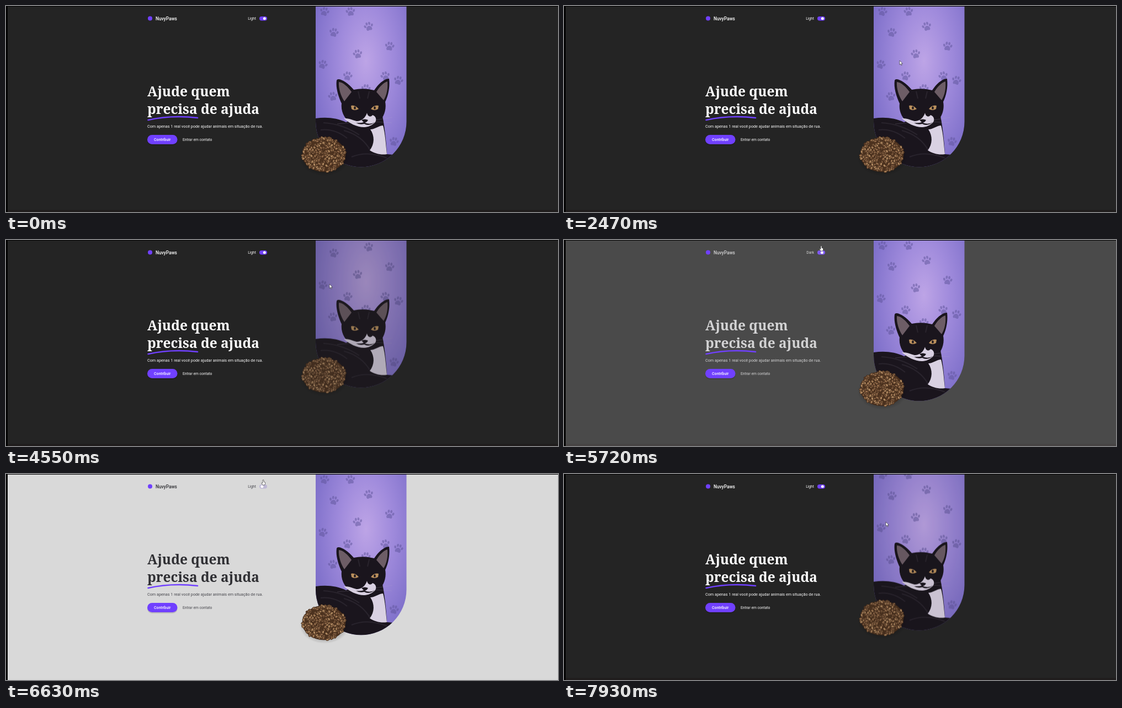
These frames come from a looping animation (1000x374 px, 8000 ms). An HTML page:

```html
<!DOCTYPE html>
<html lang="pt-BR">
<head>
<meta charset="utf-8">
<title>NuvyPaws</title>
<style>
  html, body { margin: 0; width: 100%; height: 100%; overflow: hidden; background: #000; }
  svg { display: block; width: 1000px; height: 374px; font-family: Roboto, sans-serif; }
  #page { fill: var(--bg); }
  #floor { fill: var(--floor); }
  .title { font: 700 24.45px "Noto Serif", serif; fill: var(--title); }
  .brand { font-size: 8.3px; font-weight: 500; fill: var(--title); }
  .lead { font-size: 7.24px; fill: var(--text); }
  .small { font-size: 6.7px; fill: var(--text); }
  .button { font-size: 6.8px; font-weight: 500; fill: #fff; }
  .accent { fill: #7040ff; }
  #track { fill: var(--track); }
  .fur { fill: #1a151d; }
  .sheen { fill: none; stroke: #3d3542; stroke-width: 2; opacity: .45; }
  .white { fill: #d9d1e2; }
  .ear { fill: #6d5d66; }
  .eye { fill: #b98f5c; }
  .whisker { fill: none; stroke: #b9b0c4; stroke-width: .4; opacity: .5; }
  #paws { fill: #5d5298; opacity: .5; }
  #food ellipse { stroke: #3d2718; stroke-width: .8; }
</style>
</head>
<body>
<svg viewBox="0 0 1000 374">
  <defs>
    <radialGradient id="wall" gradientUnits="userSpaceOnUse" cx="0" cy="0" r="1"
      gradientTransform="translate(652 100) scale(105 220)">
      <stop offset="0" stop-color="#bda4e6"/>
      <stop offset=".45" stop-color="#a08bdc"/>
      <stop offset="1" stop-color="#7b6dc8"/>
    </radialGradient>
    <radialGradient id="shade">
      <stop offset=".6" stop-color="#000" stop-opacity=".3"/>
      <stop offset="1" stop-color="#000" stop-opacity="0"/>
    </radialGradient>
    <clipPath id="frame">
      <path d="M561-20H725.5V210A82.2 82.2 0 0 1 561 210Z"/>
    </clipPath>
    <g id="paw">
      <path d="M0-1C3-1 6 3 5 6C4 8.500 2 7 0 7S-4 8.500-5 6C-6 3-3-1 0-1Z"/>
      <ellipse cx="-6.300" cy="-1" rx="1.900" ry="2.700" transform="rotate(-25 -6.300 -1)"/>
      <ellipse cx="-2.400" cy="-5" rx="1.900" ry="2.900"/>
      <ellipse cx="2.400" cy="-5" rx="1.900" ry="2.900"/>
      <ellipse cx="6.300" cy="-1" rx="1.900" ry="2.700" transform="rotate(25 6.300 -1)"/>
    </g>
  </defs>

  <rect id="page" x="3" y="1" width="997" height="373"/>
  <rect id="floor" x="3" y="370" width="997" height="4"/>

  <circle class="accent" cx="261" cy="22.500" r="4"/>
  <text class="brand" x="271" y="25.600">NuvyPaws</text>
  <text class="small" id="mode" x="453" y="25" text-anchor="end">Light</text>
  <rect id="track" x="459" y="19" width="14" height="7.400" rx="3.700"/>
  <circle id="knob" cy="22.700" r="2.500" fill="#fff"/>

  <text class="title" x="256" y="164">Ajude quem</text>
  <text class="title" x="256" y="195.500">precisa de ajuda</text>
  <path d="M257.500 207Q300 197.500 347 203" fill="none" stroke="#7040ff" stroke-width="2.600" stroke-linecap="round"/>
  <text class="lead" x="256" y="220.500">Com apenas 1 real você pode ajudar animais em situação de rua.</text>
  <rect x="256" y="236" width="54.500" height="17" rx="8.500" fill="#000" opacity=".14"/>
  <rect class="accent" x="256" y="234" width="54.500" height="17" rx="8.500"/>
  <text class="button" x="283.200" y="245" text-anchor="middle">Contribuir</text>
  <text class="small" x="320" y="245">Entrar em contato</text>

  <g id="hero">
    <g clip-path="url(#frame)">
      <rect x="561" y="-20" width="165" height="313" fill="url(#wall)"/>
      <g id="paws"></g>
      <path class="fur" d="M561 204C580 201 600 203 616 211L640 200H682C687 225 689 250 690 269L726 272V295H561Z"/>
      <path class="sheen" d="M575 212Q610 214 640 234M612 226Q645 235 660 262M626 274Q655 262 690 276M570 225Q595 222 618 240"/>
      <path class="white" d="M660 224C668 224 676 217 683 217C687 232 688 250 690 269C680 271 668 268 659 262C668 250 668 236 660 224Z"/>
      <path class="fur" d="M599 135C602 129 618 138 630 152Q648 148 667 153C674 142 686 131 694 132C696 148 692 164 687 174C690 190 683 205 672 213C662 222 640 224 628 214C614 208 606 192 608 177C602 164 597 148 599 135Z"/>
      <path class="ear" d="M603 138C610 138 620 147 626 156L613 173C607 164 602 150 603 138ZM691 137C684 139 676 147 671 156L684 171C690 162 692 149 691 137Z"/>
      <path class="sheen" d="M638 155L641 168M658 155L655 168"/>
      <path class="eye" d="M625 181Q632 179 639 187Q631 191 626 187ZM675 181Q667 179 661 187Q668 191 674 187Z"/>
      <ellipse cx="632" cy="185" rx="1.800" ry="2.800" fill="#1a151d"/>
      <ellipse cx="668" cy="185" rx="1.800" ry="2.800" fill="#1a151d"/>
      <path class="white" d="M654 194C655 200 660 203 664 198C671 200 672 208 668 212C660 219 653 220 648 220C636 220 622 213 612 204C622 203 631 209 637 209C645 208 651 203 654 194Z"/>
      <path class="fur" d="M644 207Q650 204 656 207Q654 211 650 212Q660 216 668 211Q658 219 649 214Q640 216 634 212Q643 213 648 211Z"/>
      <path class="whisker" d="M664 208L700 202M664 210L699 212M634 211L600 214"/>
    </g>
    <ellipse cx="577" cy="275" rx="45" ry="33" fill="url(#shade)"/>
    <g id="food"><ellipse cx="576" cy="270" rx="39" ry="31" fill="#4e331f"/></g>
  </g>
  <rect width="1000" height="1"/>

  <g id="cursor" stroke="#222" stroke-width=".6" stroke-linejoin="round" fill="#fff">
    <path id="arrow" d="M0 0V7.600L1.800 6L3 8.800L4.300 8.200L3.100 5.600H5.400Z"/>
    <path id="hand" d="M-1 0Q0-1 1 0V3.300L3.600 4.200Q4 7 2.600 9H-1.200L-3.300 5.400Q-2.500 4.200-1 5.600Z"/>
  </g>
</svg>

<script>
const LOOP = 8000, STEP = 130, RISE = 110, REVEAL = 900, FADE = 400;
const SVG = "http://www.w3.org/2000/svg";
const $ = id => document.getElementById(id);
const clamp = v => Math.min(1, Math.max(0, v));
const mix = (a, b, p) => a + (b - a) * p;

function add(parent, tag, attrs) {
  const node = parent.appendChild(document.createElementNS(SVG, tag));
  for (const key in attrs) node.setAttribute(key, attrs[key]);
}

function bezier(x1, y1, x2, y2) {
  const at = (a, b, s) => 3 * a * s * (1 - s) ** 2 + 3 * b * s * s * (1 - s) + s ** 3;
  return x => {
    if (x <= 0 || x >= 1) return clamp(x);
    let low = 0, high = 1;
    for (let i = 0; i < 24; i++) {
      const mid = (low + high) / 2;
      if (at(x1, x2, mid) < x) low = mid; else high = mid;
    }
    return at(y1, y2, low);
  };
}
const ease = bezier(.25, .1, .25, 1);
const revealEase = bezier(.5, 0, 0, 1);

const paws = [[577, 10, 15], [624, 10, -8], [657, 37, -15], [594, 48, 12], [695, 73, 8],
  [637, 87, -10], [574, 106, 20], [619, 127, 10], [687, 127, -15], [711, 135, 15],
  [652, 150, 5], [592, 164, -10], [703, 246, 12]];
for (const [x, y, turn] of paws)
  add($("paws"), "use", { href: "#paw", transform: `translate(${x} ${y}) rotate(${turn})` });

let seed = 11;
const random = () => (seed = seed * 16807 % 2147483647) / 2147483647;
const browns = ["#a17a55", "#8a6445", "#ae875f", "#946d4b", "#765439"];
for (let i = 0; i < 320; i++) {
  const angle = random() * Math.PI * 2, reach = Math.sqrt(random());
  const x = 576 + 38.5 * reach * Math.cos(angle), y = 270 + 31 * reach * Math.sin(angle);
  add($("food"), "ellipse", {
    cx: x, cy: y, rx: 2.9, ry: 2.1, fill: browns[i % browns.length],
    transform: `rotate(${random() * 180} ${x} ${y})`
  });
}

// Each reload hides the picture briefly, then reveals it.
const reloads = [[1180, 1270], [4160, 4160], [7280, 7383]];
const lightOn = 5660, lightOff = 6585;

// Pointer trips: [time, x, y]; the pointer is away between them.
const trips = [
  [[1040, 480, 40], [1430, 606, 100], [1950, 606, 100], [2470, 608, 99], [3380, 608, 99]],
  [[3770, 408, 87], [4030, 511, 88], [4550, 586, 80], [5070, 584, 80], [5460, 466, 11], [7150, 466, 11]],
  [[7410, 500, 30], [7800, 583, 87], [8000, 583, 87]]
];

function pointerAt(t) {
  const trip = trips.find(p => t >= p[0][0] && t < p[p.length - 1][0]);
  if (!trip) return null;
  const i = trip.findIndex(p => p[0] > t);
  const [t0, x0, y0] = trip[i - 1], [t1, x1, y1] = trip[i];
  const p = (t - t0) / (t1 - t0);
  return [mix(x0, x1, p), mix(y0, y1, p)];
}

function drawTheme(t) {
  const p = ease(clamp((t - lightOn) / FADE)) - ease(clamp((t - lightOff) / FADE));
  const set = (name, dark, light) => document.documentElement.style.setProperty(
    "--" + name, `rgb(${dark.map((v, i) => Math.round(mix(v, light[i], p)))})`);
  set("bg", [36, 36, 36], [240, 240, 240]);
  set("floor", [32, 29, 29], [240, 240, 240]);
  set("title", [255, 255, 255], [20, 20, 24]);
  set("text", [250, 250, 250], [48, 48, 54]);
  set("track", [112, 64, 255], [200, 200, 207]);
  $("knob").setAttribute("cx", mix(468.3, 463.3, p));
  $("mode").textContent = t >= lightOn && t < lightOff ? "Dark" : "Light";
}

function drawHero(t) {
  const last = reloads.filter(r => t >= r[0]).pop();
  const shown = last ? revealEase(clamp((t - last[1]) / REVEAL)) : 1;
  $("hero").setAttribute("transform", `translate(0 ${(shown - 1) * RISE})`);
  $("hero").setAttribute("opacity", shown);
}

function drawPointer(t) {
  const spot = pointerAt(t);
  $("cursor").style.display = spot ? "" : "none";
  if (!spot) return;
  const pointing = t >= 5460 && t < 7150;
  $("cursor").setAttribute("transform", `translate(${spot})`);
  $("arrow").style.display = pointing ? "none" : "";
  $("hand").style.display = pointing ? "" : "none";
}

const start = performance.now();
function render() {
  const elapsed = Math.max(0, performance.now() - start) % LOOP;
  const t = Math.floor(elapsed / STEP) * STEP;
  drawTheme(t);
  drawHero(t);
  drawPointer(t);
  requestAnimationFrame(render);
}
render();
</script>
</body>
</html>
```
